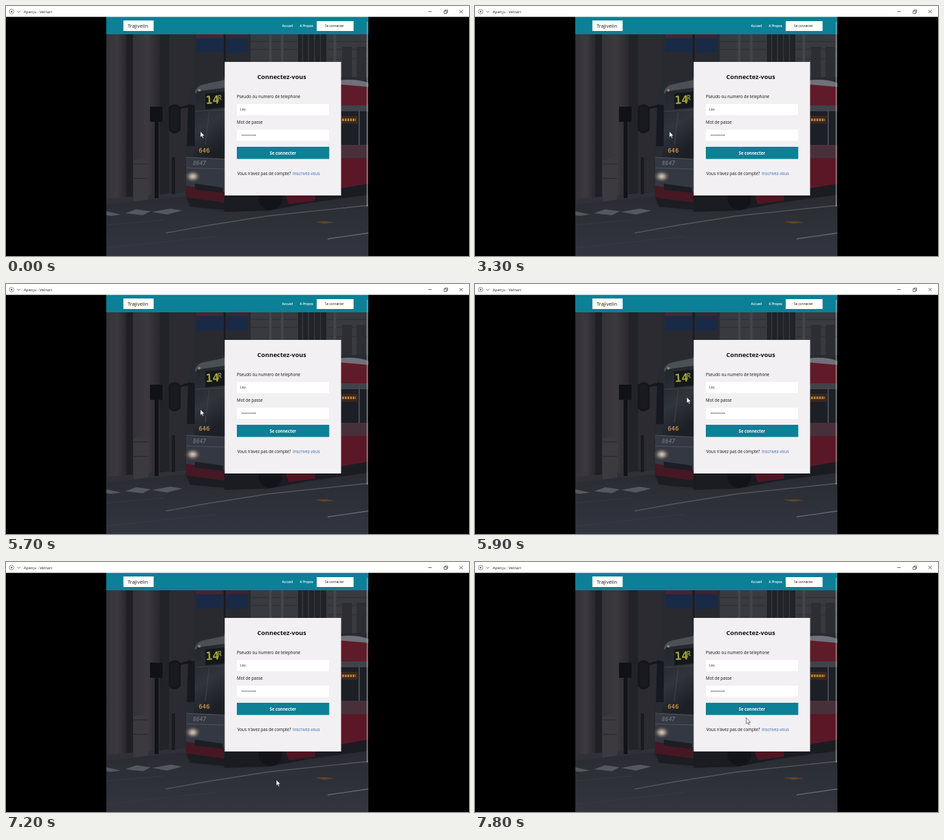
Write an HTML page that moves like this. It is 704 px wide and 380 px high and loops after 8000 ms.

```html
<!DOCTYPE html>
<html lang="fr">
<head>
<meta charset="utf-8">
<title>Aperçu</title>
<style>
html, body { margin: 0; width: 704px; height: 380px; overflow: hidden; background: #000; }
svg { display: block; font-family: "Open Sans", "Noto Sans", sans-serif; font-size: 6.3px; fill: #111; }
.nav { font-size: 4.75px; fill: #fff; font-weight: 600; }
.led { font-family: "DejaVu Sans Mono", monospace; font-weight: 700; }
</style>
</head>
<body>
<svg width="704" height="380" viewBox="0 0 704 380">
  <defs>
    <linearGradient id="road" x2="0" y2="1">
      <stop offset="0" stop-color="#292a30"/><stop offset=".35" stop-color="#2d2f37"/><stop offset="1" stop-color="#32353f"/>
    </linearGradient>
    <linearGradient id="column">
      <stop offset="0" stop-color="#343339"/><stop offset=".55" stop-color="#3b393d"/><stop offset="1" stop-color="#29282e"/>
    </linearGradient>
    <linearGradient id="glass" x2=".3" y2="1">
      <stop offset="0" stop-color="#20232a"/><stop offset=".6" stop-color="#30343b"/><stop offset="1" stop-color="#1d1f26"/>
    </linearGradient>
    <radialGradient id="lamp">
      <stop offset="0" stop-color="#d9cfbd"/><stop offset=".4" stop-color="#91877f"/><stop offset="1" stop-color="#3a3638" stop-opacity="0"/>
    </radialGradient>
    <filter id="soft" x="0" y="0" width="1" height="1"><feGaussianBlur stdDeviation=".45"/></filter>
    <clipPath id="page"><rect x="152.5" y="16" width="398.5" height="364"/></clipPath>
  </defs>
  <rect width="704" height="380" fill="#000"/>

  <g clip-path="url(#page)">
    <g filter="url(#soft)">
      <rect x="145" y="16" width="412" height="370" fill="#26272d"/>
      <!-- facade -->
      <rect x="152" y="43" width="31" height="265" fill="url(#column)"/>
      <rect x="183" y="43" width="10" height="260" fill="#1f1f24"/>
      <rect x="193" y="43" width="41" height="255" fill="url(#column)"/>
      <rect x="234" y="43" width="14" height="250" fill="#222328"/>
      <rect x="248" y="43" width="38" height="240" fill="#2b2b31"/>
      <rect x="286" y="43" width="86" height="85" fill="#292a30"/>
      <path d="M372 43H551V125H372Z" fill="#393a40"/>
      <path d="M372 54H443M372 66H443M488 54H551M488 66H551M488 80H551" stroke="#303137" stroke-width="1.5"/>
      <path d="M402 43V86M420 43V86M500 43V86" stroke="#43444a" stroke-width="4"/>
      <path d="M444 43H487V86H444Z" fill="#222329"/>
      <path d="M451 43V86M460 43V86M469 43V86M478 43V86" stroke="#383940" stroke-width="1.4"/>
      <path d="M511 62H526V112H511ZM533 62H547V112H533Z" fill="#2d2e34"/>
      <!-- banners -->
      <path d="M289 43H330V70L289 71Z" fill="#192a46"/>
      <path d="M289 43H330V49H289Z" fill="#492430"/>
      <path d="M335 43H368V70L335 72Z" fill="#192a46"/>
      <path d="M335 43H368V49H335Z" fill="#402431"/>
      <path d="M331 43H334V112H331Z" fill="#1b1c21"/>
      <!-- road -->
      <path d="M152 300L275 283H551V380H152Z" fill="url(#road)"/>
      <path d="M152 293L273 283V289L152 302Z" fill="#303138"/>
      <path d="M152 312L175 317L160 319L152 318ZM181 315L198 309L220 312L208 318ZM222 313L250 308L268 311L245 317Z" fill="#555861"/>
      <path d="M243 345L304 334L399 319L551 303" fill="none" stroke="#555861" stroke-width="1.3"/>
      <path d="M152 333L240 325M152 368L320 350" stroke="#373a43" stroke-width="1"/>
      <path d="M489 354L551 345" stroke="#666a73" stroke-width="1.3"/>
      <path d="M470 328L485 327L500 329L483 331Z" fill="#5c452c"/>
      <!-- street furniture -->
      <path d="M194 235Q205 230 216 235V294L194 297Z" fill="#3b3a3f"/>
      <path d="M194 240H216M194 262H216" stroke="#2e2d33" stroke-width="1.4"/>
      <path d="M226 154H232V292H226Z" fill="#121318"/>
      <path d="M219 153H238V176H219Z" fill="#111217"/>
      <path d="M252 230H257V286H252Z" fill="#1a1b20"/>
      <!-- bus -->
      <path d="M273 296L272 228L279 137Q282 119 298 115L333 108H551V286L400 311L330 313L280 306Z" fill="#282b32"/>
      <path d="M287 132Q289 121 301 119L334 112V127L290 133Z" fill="#4b5055"/>
      <path d="M290 130L334 124V232L285 229Z" fill="url(#glass)"/>
      <path d="M303 133L334 130V154L303 157Z" fill="#14181b"/>
      <path d="M288 160L333 158M309 161L303 211" fill="none" stroke="#474c50" stroke-width=".8"/>
      <path d="M277 149L287 151V213H275Z" fill="#17191f"/>
      <path d="M249 154Q258 147 264 155V188Q256 196 249 188ZM264 156Q274 150 283 154" fill="#191a20" stroke="#15161b" stroke-width="3"/>
      <path d="M274 230L334 233V284L274 281Z" fill="#343842"/>
      <path d="M274 230L334 233M274 246L334 248" stroke="#4f535a" stroke-width="1"/>
      <path d="M274 273L334 283V301L274 294Z" fill="#451823"/>
      <path d="M274 291L334 299V310L280 305Z" fill="#1b1d23"/>
      <ellipse cx="284" cy="259" rx="13" ry="10" fill="url(#lamp)"/>
      <path d="M287 270L330 276V284L287 279Z" fill="#1c1e24"/>
      <circle cx="294" cy="128" r="2" fill="#9a8266"/>
      <path d="M332 286H551V287L462 299L400 311L332 313Z" fill="#1a1c22"/>
      <path d="M424 285H470V296L430 301Z" fill="#501522"/>
      <ellipse cx="402" cy="293" rx="18" ry="17" fill="#131419"/>
      <path d="M505 113Q534 111 551 117V152L505 150Z" fill="#601b28"/>
      <path d="M505 113Q534 110 551 117V123L505 119Z" fill="#70717a"/>
      <path d="M505 151H551V160H505Z" fill="#41424a"/>
      <path d="M505 160H551V211H505Z" fill="#1c1f26"/>
      <path d="M537 155V222" stroke="#4a4b52" stroke-width="2"/>
      <path d="M505 211H551V238H505Z" fill="#48303a"/>
      <path d="M505 231H551V277L505 285Z" fill="#5a1827"/>
      <path d="M505 278L551 270V285L505 291Z" fill="#1b1c22"/>
      <path d="M509 167H535V179H509Z" fill="#3b281d"/>
      <path d="M511 173H532" stroke="#b47a35" stroke-width="4" stroke-dasharray="3 1"/>
    </g>
    <g class="led">
      <text x="304" y="149" font-size="17" fill="#a6a63e" transform="rotate(-3 304 149)">14</text>
      <text x="322" y="143" font-size="10" fill="#8c8f3b">R</text>
      <text x="293" y="223" font-size="9.3" fill="#bd8b3d">646</text>
      <text x="284" y="242" font-size="8.5" fill="#696c73" font-style="italic">8647</text>
    </g>

    <rect x="152" y="16" width="400" height="27" fill="#0b8096"/>
    <rect x="178.5" y="22" width="46" height="16" fill="#fff"/>
    <text x="185" y="33" font-size="7.5">Trajivelin</text>
    <text class="nav" x="419.8" y="32">Accueil</text>
    <text class="nav" x="446.8" y="32">A Propos</text>
    <rect x="472.5" y="23" width="56" height="15" fill="#fff"/>
    <text x="485" y="32" font-size="4.8">Se connecter</text>

    <rect x="332.5" y="85" width="177" height="203" fill="#f2f0f2"/>
    <text x="382" y="111" font-size="9.5" font-weight="700">Connectez-vous</text>
    <text x="351" y="140.3">Pseudo ou numero de telephone</text>
    <rect x="351" y="149" width="140" height="17" fill="#fff"/>
    <text x="356" y="159" font-size="5.2" fill="#333">Léo</text>
    <text x="351" y="179">Mot de passe</text>
    <rect x="351" y="188" width="140" height="17" fill="#fff"/>
    <text x="358" y="198.5" font-size="4.5" fill="#333">*********</text>
    <rect x="351" y="214" width="140.5" height="18.5" fill="#0b8096"/>
    <text x="401" y="226.3" font-size="6.25" font-weight="700" fill="#fff">Se connecter</text>
    <text x="351.7" y="257">Vous n'avez pas de compte?</text>
    <text x="436" y="257" fill="#2f68ae">Inscrivez-vous</text>
    <rect x="548.5" y="24" width="1.5" height="281" fill="#a5a8ae" opacity=".75"/>
  </g>

  <!-- title bar -->
  <rect width="704" height="16.5" fill="#fff"/>
  <g fill="none" stroke="#444" stroke-width=".8">
    <circle cx="8.5" cy="8.5" r="3.5" stroke="#777"/>
    <circle cx="8.5" cy="8.5" r="1.2" fill="#555" stroke="none"/>
    <path d="M17 7.5L19.3 9.8L21.6 7.5M642 8.5H647.5M666 7.5H670V11.5H666ZM667.5 7.5V6H671.5V10H670M689.5 6L694.5 11M694.5 6L689.5 11"/>
  </g>
  <text x="27" y="10.8" font-size="5.95" fill="#222">Aperçu : Velnari</text>

  <path id="cursor" d="M0 0V9.2L2.1 7.2L3.6 10.4L5 9.7L3.6 6.7H6.4Z" fill="#fff" stroke="#222" stroke-width=".6"/>
</svg>
<script>
const LOOP = 8000;
// time in ms, x, y of the pointer tip
const path = [
  [0, 295.5, 190.5],
  [5800, 306, 184], [5900, 322, 172], [6000, 340, 158], [6100, 348.3, 150.5],
  [6700, 392, 297],
  [7100, 403, 318], [7200, 411, 331], [7300, 413, 343], [7400, 414, 325],
  [7500, 414, 300], [7600, 413, 270], [7700, 412, 248], [7800, 412.3, 236.7]
];
const cursor = document.getElementById("cursor");
const start = performance.now();

function draw() {
  const t = (performance.now() - start) % LOOP;
  const [, x, y] = path.findLast(step => step[0] <= t);
  cursor.setAttribute("transform", `translate(${x} ${y})`);
  requestAnimationFrame(draw);
}
draw();
</script>
</body>
</html>
```
